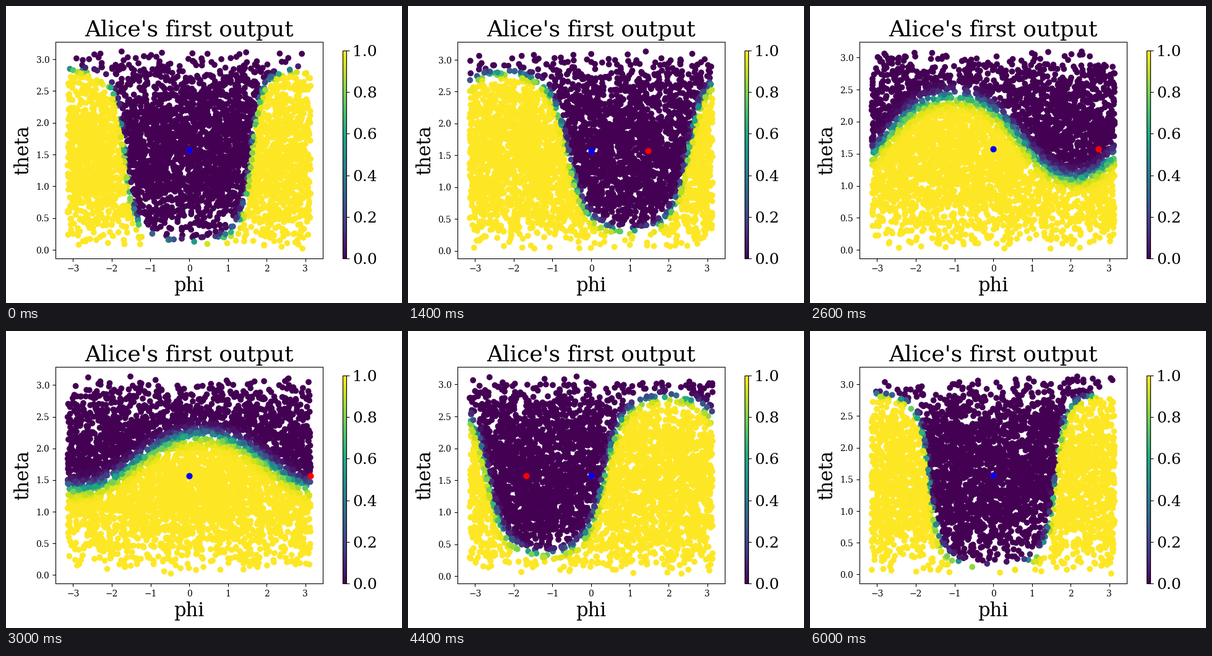
Write a matplotlib script that moves like this. It is 640 px wide and 480 px high and loops after 6.2 s.

```python
import numpy as np
import matplotlib.pyplot as plt
from matplotlib.animation import FuncAnimation
from matplotlib.ticker import MultipleLocator

FRAMES = 31
STEP_MS = 200
POINTS = 4000


def sample(k):
    """Uniform points on the sphere, drawn anew for every step."""
    rng = np.random.default_rng(100 + k)
    phi = rng.uniform(-np.pi, np.pi, POINTS)
    theta = np.arccos(rng.uniform(-1, 1, POINTS))
    return phi, theta


def output(phi, theta, t):
    """Soft step across the boundary cot(theta) = f(phi) at angle t."""
    ct = np.cos(t)
    a = 1.39 + 2.98 * ct + 1.13 * ct**2
    b = 2.5 * np.sin(t) + 0.25 * np.sin(2 * t) - 0.15
    c = -0.1 + 0.78 * ct + 0.59 * ct**2
    h = 0.9 * ((1 + ct) / 2) ** 4
    f = a * np.cos(phi) + b * np.sin(phi) + c + h * np.cos(2 * (phi - t))
    slope = b * np.cos(phi) - a * np.sin(phi) - 2 * h * np.sin(2 * (phi - t))

    # approximate angular distance to the boundary
    dist = (f * np.sin(theta) - np.cos(theta)) / np.sqrt(1 + f**2 + slope**2)
    width = 0.018 + 0.034 * ((1 - ct) / 2) ** 2
    return 1 / (1 + np.exp(dist / width))


def limits(values):
    lo, hi = values.min(), values.max()
    pad = 0.05 * (hi - lo)
    return lo - pad, hi + pad


plt.rcParams["font.family"] = "DejaVu Serif"
fig, ax = plt.subplots(figsize=(6.4, 4.8), dpi=100)
fig.subplots_adjust(left=0.125, right=0.8, bottom=0.15, top=0.88)

cloud = ax.scatter(np.zeros(POINTS), np.zeros(POINTS), c=np.zeros(POINTS),
                   cmap="viridis", vmin=0, vmax=1)
red = ax.scatter([0], [np.pi / 2], s=40, c="red")
blue = ax.scatter([0], [np.pi / 2], s=40, c="blue")

ax.set_title("Alice's first output", fontsize=26)
ax.set_xlabel("phi", fontsize=22)
ax.set_ylabel("theta", fontsize=22)
ax.xaxis.set_major_locator(MultipleLocator(1))
ax.yaxis.set_major_locator(MultipleLocator(0.5))

bar = fig.colorbar(cloud, cax=fig.add_axes([0.85, 0.15, 0.01, 0.7]))
bar.ax.tick_params(labelsize=18)


def update(k):
    t = 2 * np.pi * k / (FRAMES - 1)
    phi, theta = sample(k)
    cloud.set_offsets(np.column_stack([phi, theta]))
    cloud.set_array(output(phi, theta, t))
    wrapped = t if k <= FRAMES // 2 else t - 2 * np.pi
    red.set_offsets([[wrapped, np.pi / 2]])
    ax.set_xlim(limits(phi))
    ax.set_ylim(limits(theta))
    return cloud, red, blue


anim = FuncAnimation(fig, update, frames=FRAMES, interval=STEP_MS,
                     repeat=True, repeat_delay=0, blit=False)
plt.show()
```
